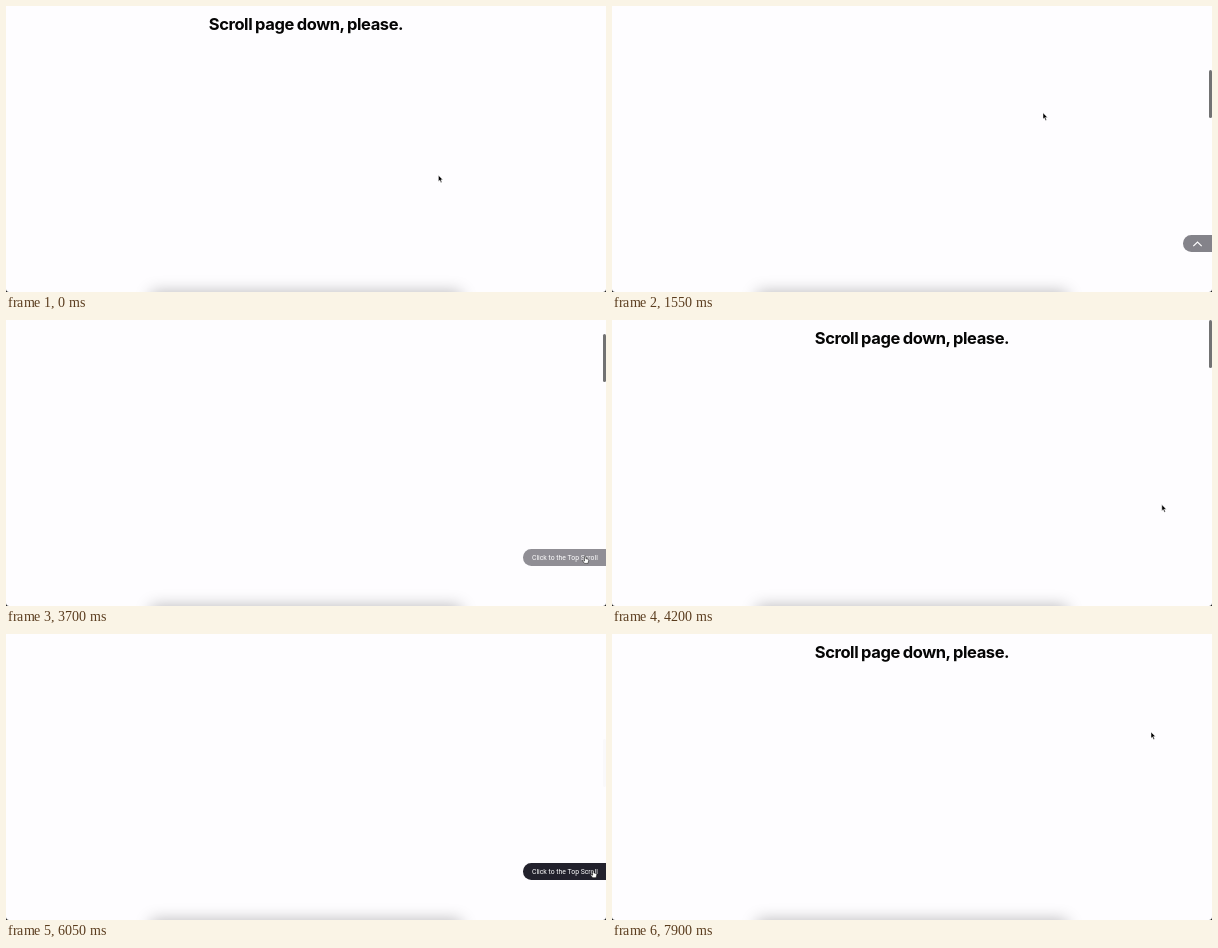
An HTML page for the animation above (8 s loop, 600x286 px).

```html
<!DOCTYPE html>
<html lang="en">
<head>
<meta charset="utf-8">
<title>Back to top</title>
<style>
  html, body { margin: 0; width: 100%; height: 100%; overflow: hidden; background: #111; }
  #stage { position: relative; width: 600px; height: 286px; overflow: hidden;
    background: #fefdff; border-radius: 0 0 3px 3px; }
  #stage > * { position: absolute; }
  h1 { left: 0; top: 8px; width: 600px; margin: 0; text-align: center; color: #050505;
    font: 700 16.5px/20px Inter, sans-serif; letter-spacing: -.42px; word-spacing: -.6px; white-space: nowrap; }
  #shadow { left: 145px; top: 286px; width: 310px; height: 40px; box-shadow: 0 0 16px rgba(0, 0, 0, .28); }
  #bar { left: 596.6px; width: 3px; height: 48px; border-radius: 2px; background: #727273; }
  #button { right: 0; top: 229.3px; height: 16.6px; overflow: hidden;
    border-radius: 8.3px 0 0 8.3px; background: #22212c; }
  #label { position: absolute; left: 9px; top: .3px; color: #fff; white-space: nowrap;
    font: 400 6.85px/17px Roboto, sans-serif; }
  #chevron { position: absolute; right: 9px; top: 5px; }
  #cursor { left: 0; top: 0; overflow: visible; }
</style>
</head>
<body>
<div id="stage">
  <h1 id="heading">Scroll page down, please.</h1>
  <div id="shadow"></div>
  <div id="button">
    <span id="label">Click to the Top Scroll</span>
    <svg id="chevron" width="11" height="8" fill="none" stroke="#fff" stroke-width="1.2">
      <path d="M1.3 6.2 5.5 2 9.7 6.2"/>
    </svg>
  </div>
  <div id="bar"></div>
  <svg id="cursor" width="10" height="10" stroke-linejoin="round">
    <path id="arrow" fill="#000" stroke="#fff" stroke-width=".5"
      d="M0 0V6.3L1.4 5 2.5 7.6 3.6 7.1 2.5 4.6H4.5Z"/>
    <path id="hand" fill="#fff" stroke="#000" stroke-width=".5"
      d="M-.7.6Q0-.4.7.6V2.7L3 3.2Q3.7 3.5 3.5 4.4L2.8 7.4H-.7L-2.7 4.6Q-2.5 3.6-1.6 4.2L-.7 5Z"/>
  </svg>
</div>
<script>
const LOOP = 8000, STEP = 50, SCROLL_RATIO = 286 / 48;
const BUTTON_WIDTH = 29, OPEN_WIDTH = 83;
const $ = id => document.getElementById(id);
const clamp = v => Math.min(1, Math.max(0, v));

// Smooth step from 0 to 1 between two times.
function ease(t, start, end) {
  const p = clamp((t - start) / (end - start));
  return p * p * (3 - 2 * p);
}

// Rises over the first interval and falls over the second.
const pulse = (t, rise, risen, fall, fallen) => ease(t, rise, risen) - ease(t, fall, fallen);

const pointerStart = { x: 432.4, y: 169.2 };
const pointerMoves = [
  { start: 0, end: 100, x: 432, y: 154 },
  { start: 400, end: 450, x: 431, y: 106.8 },
  { start: 1650, end: 2050, x: 572, y: 259 },
  { start: 2050, end: 2300, x: 579.2, y: 236 },
  { start: 4000, end: 4200, x: 549.8, y: 184.6 },
  { start: 5400, end: 5750, x: 587.3, y: 236.3 },
  { start: 7300, end: 7700, x: 539, y: 98 },
];

function pointerAt(t) {
  let { x, y } = pointerStart;
  for (const move of pointerMoves) {
    const p = ease(t, move.start, move.end);
    x += (move.x - x) * p;
    y += (move.y - y) * p;
  }
  return { x, y };
}

function draw(now) {
  const t = Math.floor(now % LOOP / STEP) * STEP;
  const top = 77 * pulse(t, 650, 1870, 3300, 3850) + 105 * pulse(t, 4400, 5300, 6450, 7050);
  const open = pulse(t, 2250, 2500, 3800, 3850) + pulse(t, 5600, 5850, 7000, 7050);
  const barAlpha = pulse(t, 600, 650, 2300, 2500) + pulse(t, 3300, 3350, 5800, 6080)
    + pulse(t, 6450, 6500, 7550, 7900);
  const shown = clamp((top - 6) / 16);
  const width = BUTTON_WIDTH + (OPEN_WIDTH - BUTTON_WIDTH) * open;
  const { x, y } = pointerAt(t);

  $('heading').style.transform = `translateY(${-top * SCROLL_RATIO}px)`;
  $('bar').style.top = top + 'px';
  $('bar').style.opacity = barAlpha;
  $('button').style.width = width + 'px';
  $('button').style.opacity = shown * (.55 + .45 * open);
  $('label').style.opacity = open;
  $('chevron').style.opacity = 1 - open;

  const pointing = shown > 0 && x > 600 - width && y > 229 && y < 246;
  $('cursor').style.transform = `translate(${x}px, ${y}px)`;
  $('hand').style.display = pointing ? '' : 'none';
  $('arrow').style.display = pointing ? 'none' : '';
  requestAnimationFrame(draw);
}
draw(0);
</script>
</body>
</html>
```
